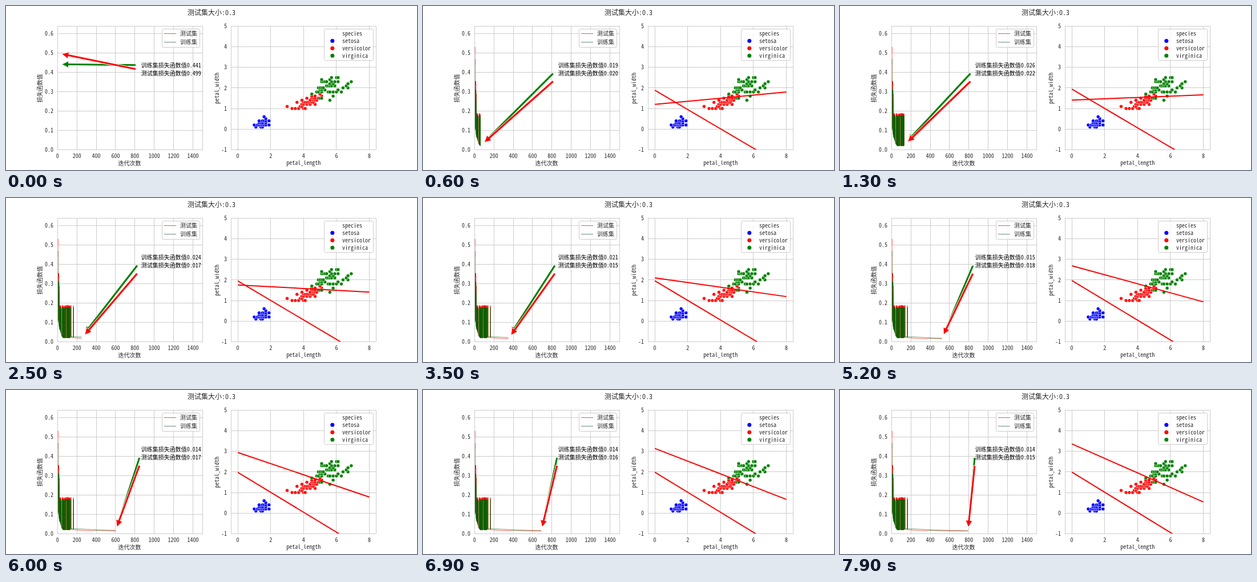
Write an HTML page that moves like this. It is 720x288 px and loops after 8000 ms.

```html
<!DOCTYPE html>
<html lang="zh-CN">
<head>
<meta charset="utf-8">
<style>
html, body { margin: 0; width: 100%; height: 100%; overflow: hidden; background: #fff; }
svg { display: block; width: 720px; height: 288px; }
text { font: 10px "Noto Sans Mono CJK SC", "Noto Sans CJK SC", "Noto Sans CJK", monospace; fill: #262626; white-space: pre; }
</style>
</head>
<body>
<svg id="stage" viewBox="0 0 720 288" xmlns="http://www.w3.org/2000/svg">
  <defs>
    <clipPath id="rightClip"><rect x="394" y="35" width="254.5" height="217.5"/></clipPath>
  </defs>
</svg>
<script>
const stage = document.getElementById('stage');
const STEP = 100, STEPS = 80, ITERATIONS = 10;

function add(tag, attrs, content) {
  const el = document.createElementNS('http://www.w3.org/2000/svg', tag);
  for (const key in attrs) el.setAttribute(key, attrs[key]);
  if (content) el.textContent = content;
  return stage.appendChild(el);
}
// y is the middle of the glyphs
function label(content, x, y, anchor = 'middle', size = 10) {
  return add('text', { x, y: y + size * 0.37, 'text-anchor': anchor, style: `font-size:${size}px` }, content);
}
function sideLabel(content, x, y) {
  label(content, 0, 0).setAttribute('transform', `translate(${x} ${y}) rotate(-90)`);
}
const snap = v => Math.floor(v) + 0.5;
const rand = n => { const v = Math.sin(n * 127.1 + 11.7) * 43758.5453; return v - Math.floor(v); };

function lerp(x, stops) {
  if (x <= stops[0][0]) return stops[0][1];
  for (let i = 1; i < stops.length; i++) {
    const [x0, y0] = stops[i - 1], [x1, y1] = stops[i];
    if (x <= x1) return y0 + (y1 - y0) * (x - x0) / (x1 - x0);
  }
  return stops[stops.length - 1][1];
}

const left = { x: v => 90.3 + v * 0.1694, y: v => 252.3 - v * 340 };
const right = { x: v => 406.1 + v * 28.8, y: v => 216.2 - v * 36.2 };

function grid(axes, x0, x1, xTicks, yTicks, digits) {
  const line = d => add('path', { d, stroke: '#ccc', fill: 'none' });
  xTicks.forEach(v => {
    line(`M${snap(axes.x(v))} 35V252`);
    label(String(v), axes.x(v), 263.5);
  });
  yTicks.forEach(v => {
    line(`M${x0} ${snap(axes.y(v))}H${x1}`);
    label(v.toFixed(digits), x0 - 7, axes.y(v), 'end');
  });
}
const frameBox = x => add('rect', { x, y: 35.5, width: 254, height: 217, fill: 'none', stroke: '#ccc' });
const legendBox = (x, y, width, height) =>
  add('rect', { x, y, width, height, rx: 2, fill: '#fff', 'fill-opacity': 0.8, stroke: '#ccc' });

// Static axes
label('测试集大小:0.3', 360, 12, 'middle', 12);
grid(left, 90, 344, [0, 200, 400, 600, 800, 1000, 1200, 1400], [0, .1, .2, .3, .4, .5, .6], 1);
grid(right, 394, 648, [0, 2, 4, 6, 8], [-1, 0, 1, 2, 3, 4, 5], 0);
label('迭代次数', 216.5, 276.5);
sideLabel('损失函数值', 59, 144.5);
label('petal_length', 521.3, 275.5);
sideLabel('petal_width', 369, 144.5);

// Petal sizes in tenths: one row per width, then the lengths
const species = [
  ['setosa', 'blue', '1:11 14 15|2:10 12 13 14 15 16 17 19|3:13 14 15 17|4:13 15 16 17 19|5:17|6:16'],
  ['versicolor', 'red', '10:33 35 37 40 41|11:30 38 39|12:39 40 42 44 47|13:36 40 41 42 43 44 45 46|' +
    '14:39 44 46 47 48|15:42 45 46 47 49|16:45 47 51|17:50|18:48'],
  ['virginica', 'green', '14:56|15:50 51|16:58|17:45|18:48 49 51 55 56 58 60 63|19:50 51 53 61|' +
    '20:49 50 51 52 64 67|21:54 55 56 57 59 66|22:56 58 67|23:51 52 53 54 57 59 61 69|24:51 56|25:57 60 61']
];
for (const [, fill, rows] of species) {
  for (const row of rows.split('|')) {
    const [width, lengths] = row.split(':');
    for (const length of lengths.split(' ')) {
      add('circle', { cx: right.x(length / 10), cy: right.y(width / 10), r: 3, fill, stroke: '#fff', 'stroke-width': 0.6 });
    }
  }
}

// Moving parts
const curve = (stroke) => add('path', { fill: 'none', stroke, 'stroke-opacity': 0.7, 'stroke-linejoin': 'round' });
const testCurve = curve('red');
const trainCurve = curve('#006400');
const boundaries = add('path', { fill: 'none', stroke: 'red', 'stroke-width': 2, 'clip-path': 'url(#rightClip)' });
const startMark = add('path', { d: 'M406 251.5v1.5', stroke: '#333' });
frameBox(90.5);
frameBox(394.5);

function note(caption, fill, y) {
  const arrow = add('path', { fill, stroke: '#fff', 'stroke-width': 1 });
  const text = label('', 236.8, y, 'start');
  text.style.fill = '#000';
  return { caption, arrow, text, y };
}
const trainNote = note('训练集损失函数值', 'green', 103.8);
const testNote = note('测试集损失函数值', 'red', 118.6);

// Legends
legendBox(273.5, 40.5, 66, 32);
add('path', { d: 'M277 48.5h21', stroke: '#ff4d4d' });
add('path', { d: 'M277 63.5h21', stroke: '#6b8e84' });
label('测试集', 305, 48.5, 'start');
label('训练集', 305, 63.5, 'start');
legendBox(557.5, 40.5, 86, 55);
label('species', 589, 48, 'start');
species.forEach(([name, fill], i) => {
  const y = 61 + i * 13;
  add('circle', { cx: 571.8, cy: y + 0.3, r: 3.5, fill });
  label(name, 589, y, 'start');
});

const spikes = [138, 139, 164, 165];
const settled = {
  test: [[130, .022], [250, .017], [350, .015], [370, .015], [380, .019], [440, .019], [600, .017], [790, .015]],
  train: [[130, .026], [250, .024], [350, .021], [440, .016], [600, .014]]
};
function loss(n, kind) {
  const test = kind === 'test';
  if (n === 0) return test ? 0.499 : 0.441;
  if (n >= 130 && !spikes.includes(n)) return lerp(n, settled[kind]);
  const scale = test ? 1 : n < 22 ? 0.88 : 0.95;
  const high = lerp(n, [[2, .535], [4, .535], [6, .36], [16, .355], [22, .19]]);
  const low = lerp(n, [[1, .4], [5, .13], [22, .07], [45, .03], [60, .02]]);
  const isHigh = n === 3 || spikes.includes(n) || rand(n) > 0.5;
  return scale * (isHigh ? high * (0.93 + 0.07 * rand(n + 500)) : low);
}

function curvePath(n, kind) {
  let d = '';
  for (let i = 0; i <= n; i++) {
    d += `${i ? 'L' : 'M'}${left.x(i).toFixed(2)} ${left.y(loss(i, kind)).toFixed(2)}`;
  }
  return d;
}

function arrowPath(ax, ay, padY, px, py) {
  const dx = px - ax, dy = py - ay, length = Math.hypot(dx, dy);
  const ux = dx / length, uy = dy / length;
  const shrink = length * 0.05;
  const from = Math.min(2 / Math.abs(ux), padY / Math.abs(uy)) + shrink;
  const tip = length - shrink, neck = tip - 12;
  const at = (along, side) => `${(ax + ux * along - uy * side).toFixed(2)} ${(ay + uy * along + ux * side).toFixed(2)}`;
  return `M${at(from, 2)}L${at(neck, 2)}L${at(neck, 6)}L${at(tip, 0)}L${at(neck, -6)}L${at(neck, -2)}L${at(from, -2)}Z`;
}

// The arrow leaves the top, middle or bottom of the caption, whichever is nearest
function updateNote(target, n, kind) {
  const value = loss(n, kind), py = left.y(value), half = 5.8;
  const offset = [-half, 0, half].reduce((best, o) =>
    Math.abs(target.y + o - py) < Math.abs(target.y + best - py) ? o : best);
  target.arrow.setAttribute('d', arrowPath(236.8, target.y + offset, offset ? 2 : 2 + half, left.x(n), py));
  target.text.textContent = target.caption + value.toFixed(3);
}

function boundaryPath(k) {
  const segment = (start, end) => `M${right.x(0)} ${right.y(start)}L${right.x(8)} ${right.y(end)}`;
  const swing = k < 13 && loss(k * ITERATIONS, 'test') > 0.1 ? 1.4 : 0;
  const upperStart = lerp(k, [[1, 1.05], [13, 1.41], [25, 1.755], [35, 2.1], [44, 2.43], [60, 2.94], [79, 3.36]]);
  const upperEnd = lerp(k, [[1, 1.9], [13, 1.66], [25, 1.41], [35, 1.19], [44, 1.09], [60, .78], [79, .54]]) + swing;
  const lowerStart = lerp(k, [[1, 1.85], [13, 1.94], [79, 1.99]]);
  const slope = lerp(k, [[13, -.469], [79, -.489]]);
  return segment(upperStart, upperEnd) + segment(lowerStart, lowerStart + slope * 8);
}

let shown = -1;
function draw(time) {
  const k = Math.floor(time / STEP) % STEPS;
  if (k === shown) return;
  shown = k;
  const n = k * ITERATIONS;
  testCurve.setAttribute('d', curvePath(n, 'test'));
  trainCurve.setAttribute('d', curvePath(n, 'train'));
  boundaries.setAttribute('d', k ? boundaryPath(k) : '');
  startMark.setAttribute('visibility', k ? 'hidden' : 'visible');
  updateNote(trainNote, n, 'train');
  updateNote(testNote, n, 'test');
}

const begin = performance.now();
function tick() {
  draw(performance.now() - begin);
  requestAnimationFrame(tick);
}
tick();
</script>
</body>
</html>
```
